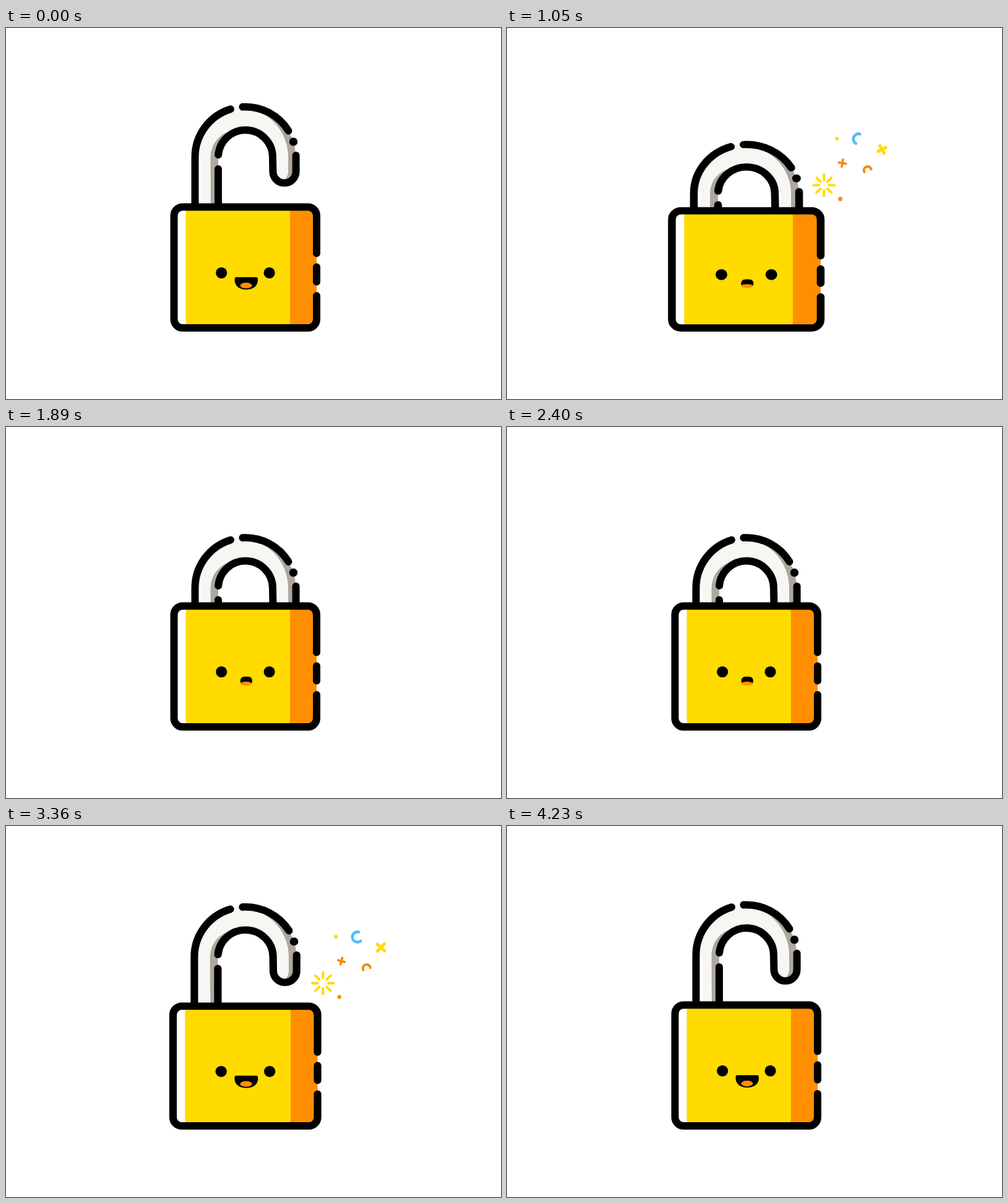
Write an HTML page with a canvas that moves like this. It is 800 px wide and 600 px high and loops after 4260 ms.

```html
<!DOCTYPE html>
<html lang="en">
<head>
<meta charset="utf-8">
<title>Padlock</title>
<style>
html, body { margin: 0; width: 100%; height: 100%; overflow: hidden; background: #fff; }
canvas { display: block; }
</style>
</head>
<body>
<canvas id="stage" width="800" height="600"></canvas>
<script>
const ctx = document.getElementById('stage').getContext('2d');
const LOOP = 4260, HALF = LOOP / 2, TRAVEL = 51.5;
const YELLOW = '#ffdb00', ORANGE = '#ff8f00', SPARK_ORANGE = '#f58a0b', BLUE = '#51bdf8';
const RAD = Math.PI / 180;

const clamp = u => Math.max(0, Math.min(1, u));
const smooth = u => u * u * (3 - 2 * u);
const mix = (a, b, u) => a + (b - a) * u;
const span = (t, a, b) => clamp((t - a) / (b - a));

// Smooth interpolation through [time, value] keys.
function keyed(t, keys) {
  const i = keys.findIndex(k => k[0] > t);
  if (i === 0) return keys[0][1];
  if (i < 0) return keys[keys.length - 1][1];
  const [a, x] = keys[i - 1], [b, y] = keys[i];
  return mix(x, y, smooth((t - a) / (b - a)));
}

const squashKeys = [
  [900, 0], [1000, 0.06], [1200, -0.045], [1430, 0.012], [1530, 0.004], [1660, 0],
  [2900, 0], [3040, -0.128], [3285, 0.029], [3480, -0.017], [3680, 0]
];

function stroke(color, width, build) {
  ctx.beginPath();
  build();
  ctx.strokeStyle = color;
  ctx.lineWidth = width;
  ctx.stroke();
}

function line(x1, y1, x2, y2) {
  ctx.moveTo(x1, y1);
  ctx.lineTo(x2, y2);
}

function dot(x, y, r, color) {
  if (r <= 0) return;
  ctx.beginPath();
  ctx.arc(x, y, r, 0, 7);
  ctx.fillStyle = color;
  ctx.fill();
}

function box(x, y, w, h, r, color) {
  ctx.beginPath();
  ctx.roundRect(x, y, w, h, r);
  ctx.fillStyle = color;
  ctx.fill();
}

function hookPath() {
  ctx.beginPath();
  ctx.moveTo(305.5, 300);
  ctx.arc(387, 209, 81.5, Math.PI, 0);
  ctx.arc(450, 232, 18.6, 0, Math.PI);
  ctx.arc(387, 209, 44, 0, Math.PI, true);
  ctx.lineTo(343.5, 300);
  ctx.closePath();
}

function shackle(y) {
  ctx.save();
  ctx.translate(0, y);
  ctx.save();
  hookPath();
  ctx.clip();
  ctx.fillStyle = '#aea79f';
  ctx.fill();
  ctx.translate(-12.5, 0);
  hookPath();
  ctx.fillStyle = '#f6f7f3';
  ctx.fill();
  ctx.translate(12.5, 0);
  box(305, 209, 11, 91, 0, '#fcfcfb');
  box(431, 209, 10, 34, 0, '#fcfcfb');
  ctx.restore();

  stroke('#000', 12, () => {
    ctx.moveTo(305.5, 300);
    ctx.arc(387, 209, 81.5, Math.PI, -107.2 * RAD);
    ctx.moveTo(382.5, 127.6);
    ctx.arc(387, 209, 81.5, -93.2 * RAD, -31.5 * RAD);
    ctx.moveTo(468.6, 206);
    ctx.arc(450, 232, 18.6, 0, Math.PI);
    ctx.arc(387, 209, 44, 0, -175 * RAD, true);
    line(343, 228, 343, 300);
  });
  dot(464.5, 184, 6.7, '#000');
  ctx.restore();
}

function body() {
  ctx.save();
  ctx.beginPath();
  ctx.roundRect(271.5, 289.5, 230.5, 195.5, 14);
  ctx.clip();
  box(265, 283, 243, 208, 0, '#fff');
  box(400, 289, 110, 198, 0, ORANGE);
  box(290.5, 291, 168.5, 192, 8, YELLOW);
  ctx.restore();
  stroke('#000', 12, () => {
    ctx.moveTo(502, 364.5);
    ctx.arcTo(502, 289.5, 271.5, 289.5, 14);
    ctx.arcTo(271.5, 289.5, 271.5, 485, 14);
    ctx.arcTo(271.5, 485, 502, 485, 14);
    ctx.arcTo(502, 485, 502, 433, 14);
    ctx.lineTo(502, 433);
    line(502, 386.5, 502, 410.5);
  });
}

// u = 0 is the smile, u = 1 the small round mouth.
function face(u) {
  dot(348.2, 396, 9.1, '#000');
  dot(425.6, 396, 9.1, '#000');
  const flat = mix(15.5, 3, u), wide = mix(18.7, 9.6, u);
  const top = mix(403, 403.8, u), mid = mix(407.5, 411, u), low = mix(423, 416.2, u);
  const knee = mix(418, 415, u), bow = mix(10.5, 7, u), rim = mix(18, 7.5, u);
  const cx = 388.3;
  ctx.beginPath();
  ctx.moveTo(cx - flat, top);
  ctx.lineTo(cx + flat, top);
  ctx.bezierCurveTo(cx + rim, top, cx + wide, mix(404, 407, u), cx + wide, mid);
  ctx.bezierCurveTo(cx + wide, knee, cx + bow, low, cx, low);
  ctx.bezierCurveTo(cx - bow, low, cx - wide, knee, cx - wide, mid);
  ctx.bezierCurveTo(cx - wide, mix(404, 407, u), cx - rim, top, cx - flat, top);
  ctx.fillStyle = '#000';
  ctx.fill();
  ctx.beginPath();
  ctx.ellipse(388, mix(416.5, 415, u), mix(9.5, 9, u), mix(4.7, 3.2, u), 0, 0, 7);
  ctx.fillStyle = ORANGE;
  ctx.fill();
}

function star(x, y, size, width, angle, color) {
  if (size <= 0) return;
  ctx.save();
  ctx.translate(x, y);
  ctx.rotate(angle * RAD);
  stroke(color, Math.min(width, size), () => {
    line(-size, 0, size, 0);
    line(0, -size, 0, size);
  });
  ctx.restore();
}

function trimArc(x, y, r, width, from, to, color) {
  stroke(color, width, () => ctx.arc(x, y, r, from * RAD, to * RAD, to < from));
}

function burst(p) {
  if (p < 655 || p > 1900) return;
  const fadeIn = span(p, 655, 700);

  const inner = keyed(p, [[660, 7.3], [1180, 8], [1470, 16], [1620, 21]]);
  const outer = keyed(p, [[660, 7.4], [1050, 17], [1230, 17.5], [1470, 19.3], [1620, 21]]);
  ctx.globalAlpha = fadeIn * (1 - span(p, 1480, 1620));
  stroke(YELLOW, 3.9, () => {
    for (let i = 0; i < 8; i++) {
      const c = Math.cos(i * 45 * RAD), s = Math.sin(i * 45 * RAD);
      line(512.3 + c * inner, 254.2 + s * inner, 512.3 + c * outer + 0.01, 254.2 + s * outer);
    }
  });

  ctx.globalAlpha = fadeIn * (1 - 0.9 * span(p, 1380, 1520));
  if (p < 1520) {
    trimArc(582.8, 230, 6, mix(4.4, 4, span(p, 690, 1000)),
      keyed(p, [[680, -91], [1000, -208], [1230, -208], [1470, 36]]),
      keyed(p, [[680, -90], [1000, -15], [1230, -8], [1470, 40]]), SPARK_ORANGE);
  }

  ctx.globalAlpha = 1;
  if (p > 780 && p < 1540) {
    trimArc(568, 179.5, 8.3, 4.6 * span(p, 780, 850) * (1 - span(p, 1480, 1540)),
      keyed(p, [[780, 286], [1200, 286], [1470, 56]]),
      keyed(p, [[780, 285], [1200, 52], [1470, 36]]), BLUE);
  }
  star(606, 196.5, keyed(p, [[750, 0], [1050, 7], [1280, 8.3], [1470, 6.8], [1620, 3], [1740, 0]]),
    5, 42 - (p - 1230) * 0.11, YELLOW);
  star(542, 218.5, keyed(p, [[680, 0], [950, 6], [1230, 5.4], [1470, 2.4], [1580, 0]]),
    3.7, 15 + (p - 1230) * 0.03, SPARK_ORANGE);
  dot(533.2, 179, keyed(p, [[820, 0], [1100, 3.2], [1300, 3.2], [1470, 2.6], [1680, 0]]), YELLOW);
  dot(558.6, 251.5, keyed(p, [[1080, 0], [1400, 2], [1520, 2], [1800, 0]]), YELLOW);
  dot(538.7, 276.5, keyed(p, [[760, 0], [1050, 3.4], [1230, 3.2], [1470, 1.5], [1600, 0]]), SPARK_ORANGE);
}

function draw(t) {
  ctx.globalAlpha = 1;
  ctx.fillStyle = '#fff';
  ctx.fillRect(0, 0, 800, 600);
  ctx.lineCap = ctx.lineJoin = 'round';

  const drop = span(t, 239, 930) ** 2 - span(t, 2426, 2997) ** 2;
  const frown = smooth(span(t, 650, 950)) - smooth(span(t, 2780, 3080));
  const squash = keyed(t, squashKeys);

  ctx.save();
  ctx.translate(386.8, 491);
  ctx.scale(1 + squash, 1 - 0.7 * squash);
  ctx.translate(-386.8, -491);
  shackle(drop * TRAVEL);
  body();
  face(frown);
  ctx.restore();

  burst(t);
  burst(t - HALF - 13);
}

function frame() {
  draw(performance.now() % LOOP);
  requestAnimationFrame(frame);
}
frame();
</script>
</body>
</html>
```
